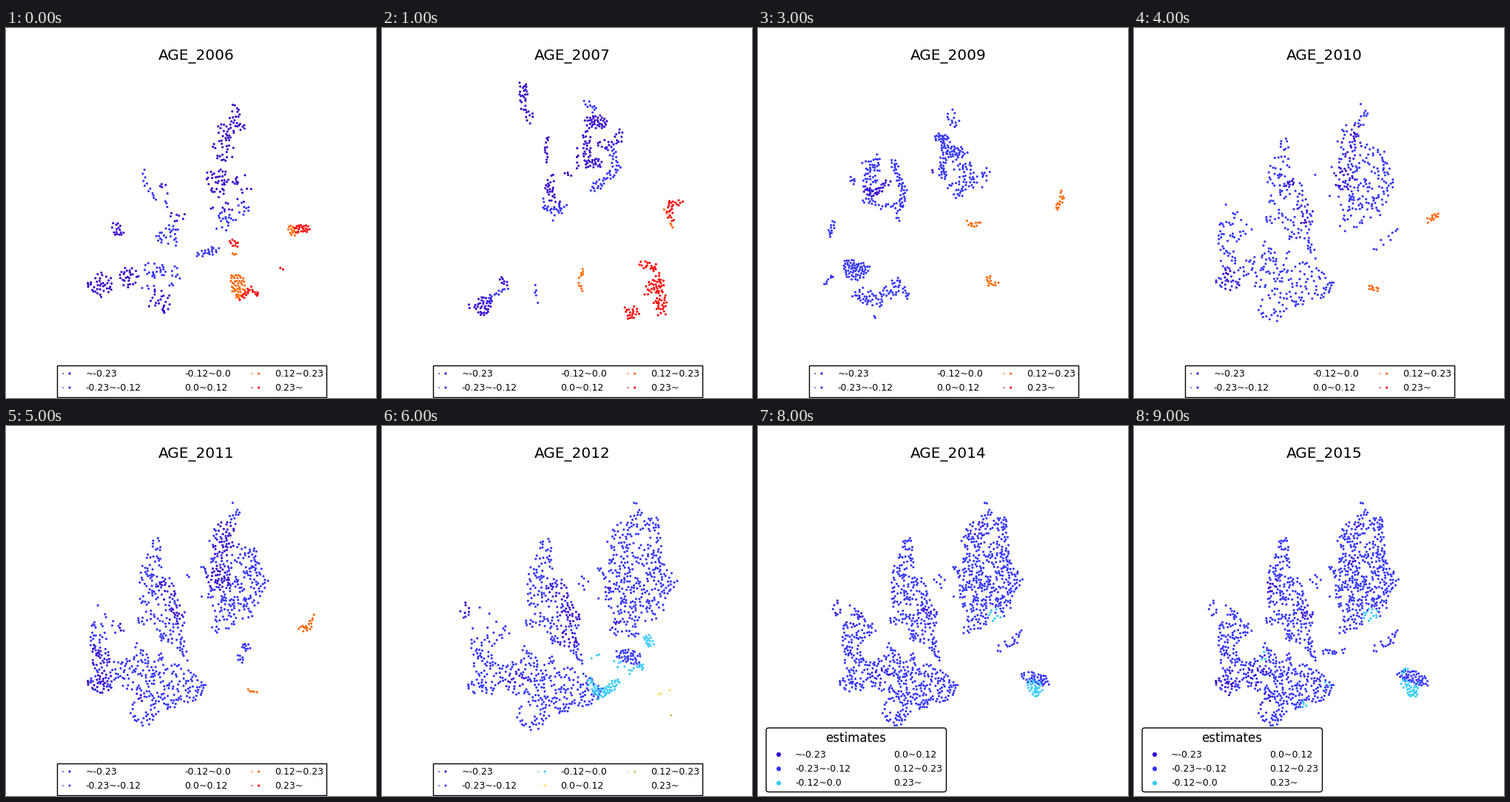
Recreate the animation shown at these times as a matplotlib script. Size 500 by 500 pixels, loop 10 s.

```python
import numpy as np
import matplotlib.pyplot as plt
from matplotlib.animation import FuncAnimation
from matplotlib.patches import FancyBboxPatch, Rectangle
from matplotlib.path import Path

SIZE, DPI = 500, 100
NAVY, BLUE, CYAN = "#3300cc", "#3333ff", "#33ccff"
YELLOW, TAN, ORANGE, RED = "#ffdd55", "#ddbb66", "#ff6600", "#ff0000"
LABELS = ["~-0.23", "-0.23~-0.12", "-0.12~0.0", "0.0~0.12", "0.12~0.23", "0.23~"]

# Outlines of the regions that the years share
EAST = [(302, 101), (313, 104), (319, 124), (336, 121), (338, 155), (341, 182),
        (359, 208), (342, 232), (341, 258), (318, 263), (300, 275), (275, 282),
        (284, 255), (272, 240), (273, 208), (263, 190), (276, 182), (274, 148),
        (284, 131), (302, 128)]
WEST = [(193, 156), (206, 149), (211, 172), (210, 204), (224, 206), (233, 238),
        (243, 252), (240, 280), (246, 318), (228, 296), (205, 290), (198, 270),
        (177, 270), (181, 232), (180, 195), (190, 178)]
SOUTH = [(113, 268), (127, 262), (124, 242), (148, 258), (162, 276), (146, 286),
         (138, 312), (158, 318), (174, 306), (176, 289), (188, 302), (198, 318),
         (209, 304), (216, 322), (236, 322), (271, 348), (262, 368), (232, 379),
         (205, 388), (192, 407), (178, 403), (166, 388), (176, 362), (148, 350),
         (130, 366), (107, 347), (122, 333), (113, 308)]
ISLE = [(97, 240), (108, 234), (115, 249), (102, 261)]
ARC = [(319, 298), (344, 286), (357, 273), (358, 286), (340, 303), (325, 306)]
GAP = [(235, 206), (248, 197), (268, 228), (262, 234)]

rng = np.random.default_rng(7)


def spaced(pts, gap=2.4):
    """Drop points that sit on top of an earlier one."""
    kept = np.empty((0, 2))
    for p in pts:
        if not len(kept) or np.hypot(*(kept - p).T).min() > gap:
            kept = np.vstack([kept, p])
    return kept


def grow(corners, density=0.115, clump=4):
    """Fill an outline with small random clumps."""
    lo, hi = np.min(corners, axis=0), np.max(corners, axis=0)
    n = int(np.prod(hi - lo) * density / clump)
    pts = np.repeat(rng.uniform(lo, hi, (n, 2)), clump, axis=0)
    pts += rng.normal(0, 3.5, pts.shape)
    return spaced(pts[Path(corners).contains_points(pts)])


def spray(col, n, width, *path):
    """Scatter n points within width of a path."""
    xs, ys = np.transpose(path)
    t = rng.uniform(0, len(path) - 1, 3 * n)
    k = np.arange(len(path))
    a = rng.uniform(0, 2 * np.pi, 3 * n)
    r = width * np.sqrt(rng.random(3 * n))
    pts = np.column_stack([np.interp(t, k, xs) + r * np.cos(a),
                           np.interp(t, k, ys) + r * np.sin(a)])
    pts = spaced(pts)[:n]
    return pts, [col] * len(pts)


LAND = np.vstack([grow(s) for s in (EAST, WEST, SOUTH, ISLE, ARC)]
                 + [grow(GAP, 0.02, 1)])
RANK = rng.random(len(LAND))


def survey(fill, tints, sprays=(), scale=(1, 1), shift=(0, 0)):
    """Show a share of the land in blue, recolour it in discs, add sprays.

    A tint is (colour, share, discs of x, y, radius); colour None clears."""
    cols = np.where(RANK < fill, BLUE, None)
    for col, share, *discs in tints:
        hit = np.zeros(len(LAND), bool)
        for x, y, r in discs:
            hit |= np.hypot(*(LAND - (x, y)).T) < r
        cols[hit & (rng.random(len(LAND)) < share)] = col
    seen = cols != None  # noqa: E711
    parts = [(LAND[seen] * scale + shift, list(cols[seen])), *sprays]
    return np.vstack([p for p, _ in parts]), sum((c for _, c in parts), [])


CROWN, NECK, HEART = (296, 138, 13), (293, 165, 16), (284, 206, 17)
SPINE, RIB, NEST = (217, 222, 14), (235, 255, 16), (220, 283, 17)
KNOT, STRAND, QUAY = (152, 271, 11), (127, 350, 20), (166, 337, 14)
PLAIN, HOME, MAST = (128, 310, 17), (106, 246, 14), (187, 215, 13)
LOBE = (329, 143, 21)

YEARS = [
    # 2006
    survey(0, [(NAVY, 0.75, (308, 112, 15), (316, 130, 9), CROWN, NECK, HEART,
                KNOT, STRAND, QUAY),
               (NAVY, 0.25, SPINE, RIB, (305, 218, 28), (290, 240, 16)),
               (BLUE, 0.5, (296, 262, 15), (320, 245, 9), NEST, (200, 325, 13)),
               (BLUE, 0.45, (222, 335, 15), (192, 348, 9)),
               (NAVY, 0.4, (208, 368, 17))],
           [spray(BLUE, 20, 6, (259, 306), (284, 300)),
            spray(BLUE, 15, 4, (184, 190), (187, 206), (198, 230), (222, 240)),
            spray(NAVY, 5, 2, (213, 378), (213, 384)),
            spray(ORANGE, 52, 10, (312, 340), (316, 358)),
            spray(ORANGE, 16, 5, (383, 270), (391, 279)),
            spray(ORANGE, 6, 2, (306, 305), (310, 306)),
            spray(RED, 30, 5, (392, 272), (407, 271)),
            spray(RED, 20, 3, (318, 366), (330, 352), (340, 360)),
            spray(RED, 10, 4, (305, 290), (311, 293)),
            spray(RED, 2, 1, (370, 325), (375, 327))]),
    # 2007
    survey(0, [], [
        spray(NAVY, 32, 7, (190, 76), (190, 96), (201, 124)),
        spray(NAVY, 12, 2, (224, 146), (221, 168), (224, 184)),
        spray(NAVY, 28, 7, (229, 195), (226, 222), (236, 240)),
        spray(NAVY, 48, 9, (281, 128), (298, 127)),
        spray(NAVY, 46, 6, (276, 140), (278, 184), (294, 182)),
        spray(NAVY, 22, 8, (289, 158), (318, 155), (320, 140)),
        spray(NAVY, 10, 3, (264, 160), (263, 197), (241, 198)),
        spray(NAVY, 36, 7, (118, 378), (144, 366), (136, 388)),
        spray(NAVY, 10, 4, (161, 340), (168, 345)),
        spray(BLUE, 10, 5, (277, 99), (287, 110)),
        spray(BLUE, 46, 6, (281, 218), (300, 208), (317, 190), (308, 160)),
        spray(BLUE, 24, 4, (217, 232), (223, 248), (246, 240), (230, 264)),
        spray(BLUE, 14, 3, (145, 372), (148, 362), (170, 353)),
        spray(BLUE, 5, 2, (207, 347), (209, 371)),
        spray(ORANGE, 11, 3, (271, 326), (265, 345), (271, 354)),
        spray(ORANGE, 6, 2, (381, 241), (391, 269)),
        spray(RED, 24, 5, (405, 236), (386, 236), (391, 260)),
        spray(RED, 18, 6, (352, 320), (374, 326)),
        spray(RED, 62, 9, (362, 356), (372, 342), (376, 370), (380, 384)),
        spray(RED, 20, 6, (330, 378), (344, 382), (334, 391))]),
    # 2008
    survey(0.3, [(None, 1, LOBE), (NAVY, 0.25, CROWN, HEART, RIB, STRAND)],
           [spray(ORANGE, 20, 7, (310, 340), (318, 352)),
            spray(RED, 12, 5, (393, 272), (402, 274))],
           (1, 1.07), (0, -8)),
    # 2009
    survey(0, [], [
        spray(BLUE, 13, 9, (264, 114), (266, 128)),
        spray(BLUE, 60, 6, (241, 148), (254, 150), (250, 200)),
        spray(BLUE, 34, 8, (260, 167), (276, 169)),
        spray(BLUE, 58, 13, (268, 190), (292, 195), (278, 212), (264, 222)),
        spray(BLUE, 9, 6, (300, 212), (314, 188)),
        spray(BLUE, 52, 10, (146, 190), (160, 180), (152, 205), (150, 225)),
        spray(BLUE, 22, 5, (140, 232), (172, 242), (195, 240)),
        spray(BLUE, 48, 5, (182, 176), (188, 195), (197, 222), (190, 262)),
        spray(BLUE, 6, 4, (124, 200), (130, 211)),
        spray(BLUE, 12, 4, (102, 260), (97, 280)),
        spray(BLUE, 8, 2, (90, 346), (100, 335)),
        spray(BLUE, 90, 11, (125, 320), (128, 332), (142, 326)),
        spray(BLUE, 64, 11, (136, 358), (158, 370), (186, 350)),
        spray(BLUE, 12, 4, (186, 336), (196, 350), (203, 365)),
        spray(BLUE, 2, 1, (157, 390), (158, 392)),
        spray(NAVY, 28, 5, (146, 217), (157, 226), (175, 207)),
        spray(NAVY, 2, 1, (236, 191), (237, 195)),
        spray(ORANGE, 12, 3, (283, 262), (293, 268), (299, 262)),
        spray(ORANGE, 16, 3, (409, 220), (411, 232), (403, 244)),
        spray(ORANGE, 18, 3, (311, 334), (312, 346), (324, 346))]),
    # 2010
    survey(0.4, [(None, 1, LOBE, HOME),
                 (NAVY, 0.35, CROWN, NECK, HEART, SPINE, RIB, STRAND)],
           [spray(ORANGE, 14, 4, (396, 262), (411, 250)),
            spray(ORANGE, 10, 3, (318, 350), (330, 354))],
           (1, 0.98), (0, 1)),
    # 2011
    survey(0.56, [(None, 1, LOBE, HOME, (345, 287, 26)),
                  (None, 0.7, (132, 255, 15), (145, 285, 12), (305, 175, 9)),
                  (NAVY, 0.7, CROWN, NECK, HEART, (296, 208, 10)),
                  (NAVY, 0.5, SPINE, RIB, PLAIN, STRAND),
                  (NAVY, 0.4, (180, 370, 9), (268, 190, 7), (155, 272, 5))],
           [spray(BLUE, 13, 4, (322, 297), (329, 299)),
            spray(BLUE, 8, 4, (315, 312), (319, 317)),
            spray(ORANGE, 20, 4, (396, 273), (408, 275), (415, 258)),
            spray(ORANGE, 10, 1, (326, 356), (332, 359), (342, 359))]),
    # 2012
    survey(0.64, [(None, 1, (345, 290, 30)), (None, 0.6, (130, 265, 22)),
                  (NAVY, 0.6, HOME, SPINE, (232, 252, 13), (228, 285, 12)),
                  (NAVY, 0.5, (171, 338, 14), (274, 218, 10), (283, 264, 9))],
           [spray(BLUE, 40, 9, (323, 307), (347, 316)),
            spray(BLUE, 8, 3, (335, 283), (346, 281)),
            spray(CYAN, 16, 5, (358, 284), (363, 297)),
            spray(CYAN, 16, 6, (318, 318), (334, 334), (355, 321)),
            spray(CYAN, 54, 6, (279, 342), (292, 364), (308, 354), (317, 346)),
            spray(CYAN, 3, 1, (277, 317), (295, 307)),
            spray(YELLOW, 6, 2, (374, 362), (377, 361)),
            spray(YELLOW, 1, 0, (389, 357), (389, 357)),
            spray(TAN, 2, 1, (391, 390), (392, 391))],
           (1.144, 1.02), (-10, -2)),
    # 2013
    survey(0.78, [(NAVY, 0.8, CROWN, HOME, (203, 163, 13), (130, 258, 13)),
                  (NAVY, 0.6, (284, 160, 13), (282, 192, 14), SPINE),
                  (NAVY, 0.4, (233, 250, 12), (192, 246, 12), KNOT)],
           [spray(BLUE, 12, 4, (162, 231), (174, 244)),
            spray(BLUE, 16, 5, (300, 318), (306, 335)),
            spray(CYAN, 76, 8, (375, 276), (377, 292), (368, 299), (383, 302)),
            spray(CYAN, 30, 8, (269, 285), (282, 280)),
            spray(CYAN, 46, 7, (286, 301), (310, 307), (313, 326)),
            spray(CYAN, 92, 9, (272, 332), (282, 350), (312, 345)),
            spray(CYAN, 9, 4, (152, 301), (155, 309))]),
    # 2014
    survey(0.76, [(NAVY, 0.35, CROWN, RIB, QUAY, HOME, (130, 258, 13)),
                  (CYAN, 0.5, (320, 255, 9))],
           [spray(BLUE, 40, 8, (362, 338), (378, 342), (393, 346)),
            spray(CYAN, 40, 7, (368, 348), (376, 360), (380, 350))]),
    # 2015
    survey(0.76, [(NAVY, 0.5, QUAY, STRAND, MAST, (178, 370, 10)),
                  (NAVY, 0.6, (235, 250, 11), (290, 271, 8), (303, 135, 6)),
                  (NAVY, 0.3, (300, 185, 12), (130, 248, 9)),
                  (CYAN, 0.9, (320, 256, 11)),
                  (CYAN, 0.5, (174, 312, 7), (234, 378, 8), (264, 348, 7))],
           [spray(BLUE, 60, 8, (362, 338), (375, 338), (393, 345)),
            spray(CYAN, 46, 6, (366, 346), (376, 364), (383, 351)),
            spray(CYAN, 5, 3, (363, 332), (368, 329)),
            spray(BLUE, 14, 6, (259, 304), (286, 303))]),
]

plt.rcParams["font.family"] = "DejaVu Sans"
fig = plt.figure(figsize=(SIZE / DPI, SIZE / DPI), dpi=DPI, facecolor="white")
ax = fig.add_axes([0, 0, 1, 1])
ax.set(xlim=(0, SIZE), ylim=(SIZE, 0))
ax.axis("off")

dots = ax.scatter([], [], s=5, linewidths=0, zorder=2)
title = ax.text(257, 43, "", size=14.4, ha="center", zorder=3)


def label(x, y, text, size=9, ha="left"):
    return ax.text(x, y, text, size=size, ha=ha, zorder=6)


def keys(spots, sizes):
    return ax.scatter(*zip(*spots), s=sizes, linewidths=0, zorder=6)


# Wide legend: two rows, three columns
wide = [ax.add_patch(Rectangle((69, 455.9), 364, 43.1, fc="white", ec="black",
                               lw=1, zorder=5))]
cells = [(x, y) for x in (77, 211, 332.5) for y in (467, 486)]
for (x, y), text in zip(cells, LABELS):
    wide.append(label(x + 30.4, y + 4, text))
wide_keys = keys([(x + d, y) for x, y in cells for d in (0, 9)], [1.6, 5] * 6)
wide.append(wide_keys)

# Titled legend: three rows, two columns
tall = [ax.add_patch(FancyBboxPatch((14, 411), 237.5, 80.5,
                                    boxstyle="round,pad=3,rounding_size=3.5",
                                    fc="white", ec="black", lw=1, zorder=5)),
        label(132.5, 427, "estimates", 12, "center"),
        keys([(28, 444 + 19.3 * k) for k in range(3)], 20)]
tall[-1].set_facecolor([NAVY, BLUE, CYAN])
for k, text in enumerate(LABELS):
    tall.append(label(50 + 133 * (k // 3), 448 + 19.2 * (k % 3), text))


def legend_colours(i):
    if i < 6:
        return [NAVY, BLUE, "none", "none", ORANGE, RED]
    if i == 6:
        return [NAVY, BLUE, CYAN, YELLOW, TAN, "none"]
    return [NAVY, BLUE, CYAN, "none", "none", "none"]


def draw(i):
    pts, cols = YEARS[i]
    dots.set_offsets(pts)
    dots.set_facecolor(cols)
    title.set_text(f"AGE_{2006 + i}")
    wide_keys.set_facecolor(np.repeat(legend_colours(i), 2))
    for art in wide:
        art.set_visible(i < 8)
    for art in tall:
        art.set_visible(i >= 8)
    return [dots, title, *wide, *tall]


anim = FuncAnimation(fig, draw, frames=len(YEARS), interval=1000, repeat=True,
                     repeat_delay=0, blit=False)
plt.show()
```
